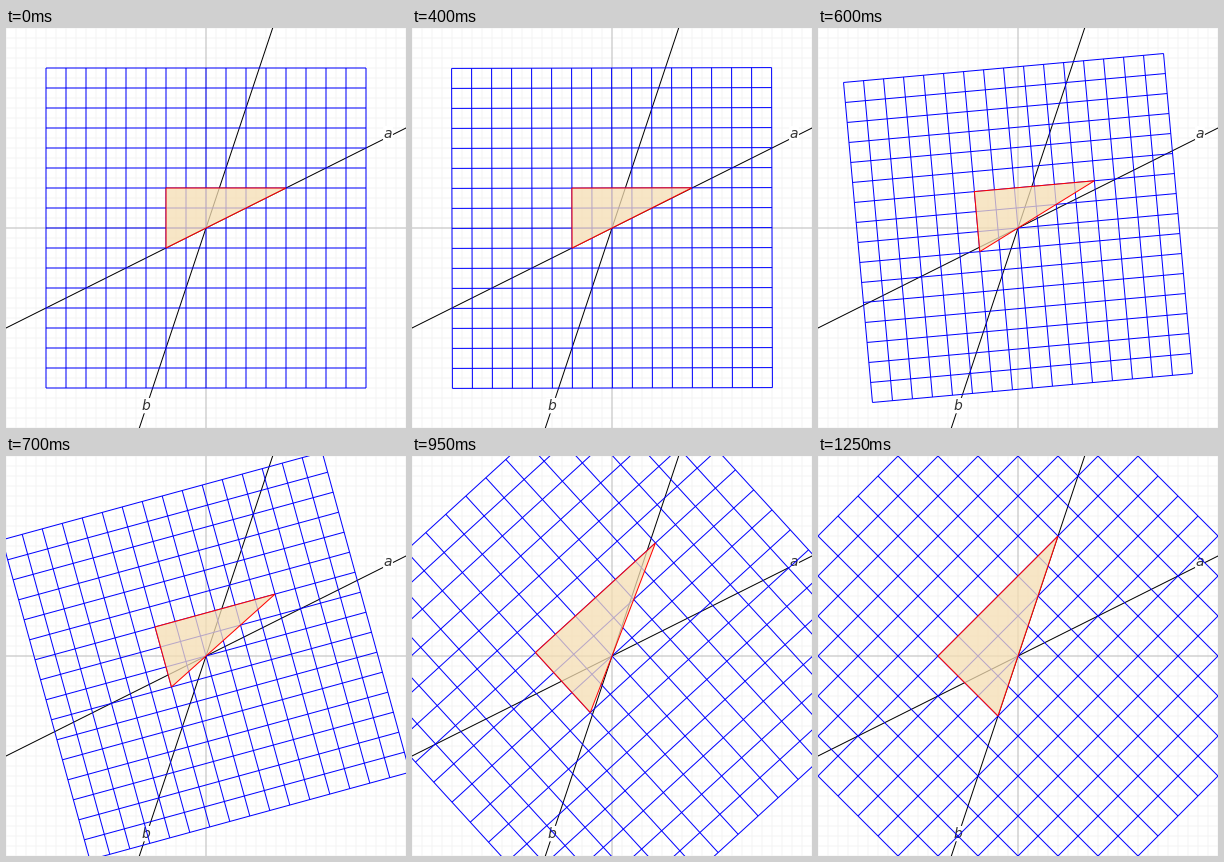
These frames come from a looping animation (400 by 400 pixels, 1500 ms). A matplotlib script:

```python
import numpy as np
import matplotlib.pyplot as plt
from matplotlib.animation import FuncAnimation
from matplotlib.collections import LineCollection

FRAMES, STEP_MS = 30, 50
START, END = 5, 25          # the move runs between these steps
HALF = 10                   # visible half-width in units
REACH = 8                   # half-width of the moving grid
PX = 0.72                   # one pixel in points at 100 dpi

plt.rcParams["path.snap"] = False   # keep lines on exact sub-pixel positions

fig = plt.figure(figsize=(4, 4), dpi=100, facecolor="white")
ax = fig.add_axes([0, 0, 1, 1])
ax.set_xlim(-HALF, HALF)
ax.set_ylim(-HALF, HALF)
ax.axis("off")


def lattice(reach, step):
    """Vertical and horizontal segments covering a square."""
    ticks = np.arange(-reach, reach + step / 2, step)
    vert = [[(v, -reach), (v, reach)] for v in ticks]
    horiz = [[(-reach, v), (reach, v)] for v in ticks]
    return np.array(vert + horiz, dtype=float)


def guide(slope, name, x, y):
    """Black line through the centre with its label set into a gap."""
    xs = np.array([-HALF, HALF])
    ax.plot(xs, slope * xs, color="black", lw=PX, zorder=3)
    ax.text(x, y, name, size=10, style="italic", family="DejaVu Sans",
            color="#333333", ha="center", va="center", zorder=4,
            bbox=dict(facecolor="white", edgecolor="none", pad=0.5))


def ease(x, power=3.3):
    return x**power / (x**power + (1 - x)**power)


ax.add_collection(LineCollection(lattice(HALF, 0.5), colors="#f5f5f5",
                                 linewidths=PX, zorder=1))
ax.axhline(0, color="#c0c0c0", lw=PX, zorder=2)
ax.axvline(0, color="#c0c0c0", lw=PX, zorder=2)
guide(0.5, "a", 9.1, 4.72)
guide(3, "b", -3.03, -8.88)

GRID = lattice(REACH, 1)
TRIANGLE = np.array([(-2, -1), (4, 2), (-2, 2)], dtype=float)

mesh = LineCollection(GRID, colors="blue", linewidths=PX, zorder=5)
ax.add_collection(mesh)
shape = plt.Polygon(TRIANGLE, facecolor=(0.961, 0.871, 0.702, 0.75),
                    edgecolor="red", lw=PX, zorder=6)
ax.add_patch(shape)


def update(i):
    angle = np.pi / 4 * ease(np.clip((i - START) / (END - START), 0, 1))
    s = np.tan(angle)
    turn = np.array([[1, -s], [s, 1]])
    mesh.set_segments(GRID @ turn.T)
    shape.set_xy(TRIANGLE @ turn.T)
    return mesh, shape


anim = FuncAnimation(fig, update, frames=FRAMES, interval=STEP_MS,
                     init_func=lambda: update(0), repeat=True, repeat_delay=0)
plt.show()
```
